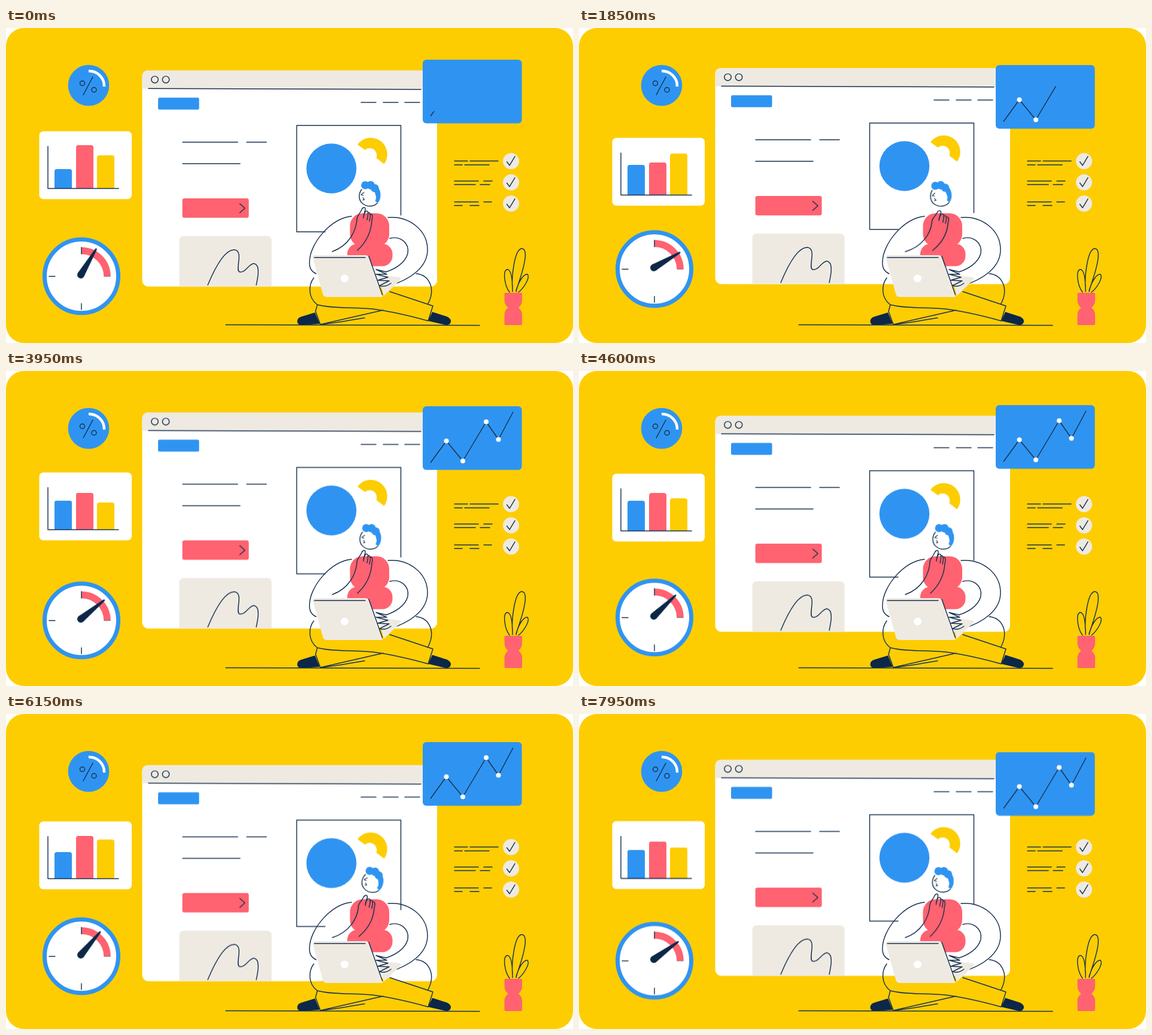
These frames come from a looping animation (947x527 px, 8 s). An HTML page without scripts:

```html
<!DOCTYPE html>
<html lang="en">
<head>
<meta charset="utf-8">
<title>Dashboard at work</title>
<style>
  :root {
    --both: cubic-bezier(.37, 0, .63, 1);
    --in: cubic-bezier(.4, 0, .7, .65);
    --out: cubic-bezier(.3, .35, .6, 1);
  }
  html, body { margin: 0; width: 100%; height: 100%; overflow: hidden; background: #fff; }
  svg { display: block; width: 100%; height: 100%; }

  .blue { fill: #2f94f1; }
  .pink { fill: #ff6270; }
  .yellow { fill: #fdcd02; }
  .beige { fill: #eeeae2; }
  .white { fill: #fff; }
  .navy { fill: #0c2748; }
  .ink { fill: none; stroke: #17304f; stroke-width: 1.45; stroke-linecap: round; stroke-linejoin: round; }
  .fine { stroke-width: 1.1; }

  .move { animation: 8s infinite var(--both); }
  .page { animation-name: page; }
  .bars { animation-name: bars; }
  .dial { animation-name: dial; }
  .chart { animation-name: chart; }
  .bar1 { animation-name: bar1; }
  .bar2 { animation-name: bar2; }
  .bar3 { animation-name: bar3; }
  .needle { animation-name: needle; transform-origin: 125px 413px; }
  .head { animation-name: head; transform-origin: 607px 310px; }
  .arm { animation-name: arm; transform-origin: 545px 377px; }
  .trend { stroke-dasharray: 253; stroke-linecap: butt; animation: trend 8s infinite linear; }

  @keyframes page {
    0% { transform: none; animation-timing-function: linear; }
    23.125% { transform: translateY(-4px); animation-timing-function: var(--out); }
    35.5% { transform: translateY(-6px); }
    81.5% { transform: translateY(15px); animation-timing-function: var(--in); }
    99.375%, 100% { transform: translateY(5.5px); }
  }
  @keyframes bars {
    0% { transform: none; }
    23.125% { transform: translateY(11px); animation-timing-function: var(--in); }
    38.125% { transform: translateY(4px); animation-timing-function: var(--out); }
    49.375% { transform: translateY(-3px); animation-timing-function: var(--in); }
    65% { transform: translateY(-.5px); animation-timing-function: var(--out); }
    76.875% { transform: translateY(7px); }
    99.375%, 100% { transform: translateY(6.5px); }
  }
  @keyframes dial {
    0% { transform: none; }
    23.125% { transform: translateY(-12px); animation-timing-function: var(--in); }
    38.125% { transform: translateY(-3px); animation-timing-function: var(--out); }
    49.375% { transform: translateY(2px); animation-timing-function: var(--in); }
    65% { transform: translateY(-4px); animation-timing-function: var(--out); }
    76.875% { transform: translateY(-10px); }
    99.375%, 100% { transform: translateY(-2.5px); }
  }
  @keyframes chart {
    0% { transform: none; }
    23.125% { transform: translateY(9px); }
    38.125% { transform: translateY(-1px); }
    49.375% { transform: translateY(6px); animation-timing-function: var(--in); }
    65% { transform: translateY(3.7px); animation-timing-function: var(--out); }
    76.875% { transform: translateY(-6px); }
    99.375%, 100% { transform: translateY(10.5px); }
  }
  @keyframes bar1 {
    0% { transform: none; }
    23.125% { transform: translateY(-18px); }
    38.125% { transform: translateY(-15.5px); }
    49.375% { transform: translateY(-16.5px); }
    65% { transform: translateY(-19.5px); }
    76.875% { transform: translateY(-12px); }
    99.375%, 100% { transform: translateY(-15.5px); }
  }
  @keyframes bar2 {
    0% { transform: none; }
    23.125% { transform: translateY(18px); }
    38.125% { transform: translateY(8px); }
    49.375% { transform: translateY(10.5px); }
    65% { transform: translateY(8.5px); }
    76.875% { transform: translateY(1px); }
    99.375%, 100% { transform: translateY(10.5px); }
  }
  @keyframes bar3 {
    0% { transform: none; }
    23.125% { transform: translateY(-14px); animation-timing-function: var(--in); }
    38.125% { transform: translateY(1px); animation-timing-function: var(--out); }
    49.375% { transform: translateY(10px); animation-timing-function: var(--in); }
    65% { transform: translateY(-1px); animation-timing-function: var(--out); }
    76.875% { transform: translateY(-10px); }
    99.375%, 100% { transform: translateY(3.5px); }
  }
  @keyframes needle {
    0% { transform: rotate(30.6deg); }
    23.125% { transform: rotate(59.6deg); }
    38.125% { transform: rotate(42.7deg); }
    49.375% { transform: rotate(51deg); }
    65% { transform: rotate(42deg); }
    76.875% { transform: rotate(40deg); }
    99.375%, 100% { transform: rotate(54deg); }
  }
  @keyframes head {
    0% { transform: rotate(0deg); }
    23.125% { transform: rotate(-6deg); }
    38.125%, 49.375% { transform: rotate(2deg); }
    65% { transform: rotate(1.5deg); }
    76.875% { transform: rotate(9deg); }
    99.375%, 100% { transform: rotate(.5deg); }
  }
  @keyframes arm {
    0% { transform: scale(1); }
    23.125% { transform: scale(1.08, .93); }
    38.125% { transform: scale(.95, 1.05); }
    49.375%, 65% { transform: scale(1); }
    76.875% { transform: scale(1.06, .96); }
    99.375%, 100% { transform: scale(.99, .99); }
  }
  @keyframes trend {
    0% { stroke-dashoffset: 243; }
    39.1%, 100% { stroke-dashoffset: 0; }
  }
</style>
</head>
<body>
<svg viewBox="0 0 947 527" preserveAspectRatio="none">
  <defs>
    <clipPath id="floor"><rect x="60" y="100" width="140" height="168.5"/></clipPath>
    <g id="check">
      <circle class="beige" r="13.5"/>
      <path class="ink" d="M-7 1 L-2.5 7 L6.5 -8"/>
    </g>
  </defs>
  <rect class="yellow" width="947" height="527" rx="30"/>

  <!-- percent badge -->
  <circle class="blue" cx="138" cy="96" r="34.3"/>
  <path d="M138 72 A25 25 0 0 1 164 98" fill="none" stroke="#fff" stroke-width="4.5"/>
  <path class="ink" d="M129 112 L145 82"/>
  <circle class="ink" cx="127.5" cy="92.5" r="4"/>
  <circle class="ink" cx="147" cy="103.5" r="4"/>

  <!-- bar card -->
  <g class="move bars">
    <rect class="white" x="55.5" y="172.7" width="154.5" height="113.5" rx="7"/>
    <g clip-path="url(#floor)">
      <rect class="blue move bar1" x="81" y="236" width="29" height="120" rx="4"/>
      <rect class="pink move bar2" x="117" y="196" width="29" height="120" rx="4"/>
      <rect class="yellow move bar3" x="152" y="213" width="29" height="120" rx="4"/>
    </g>
    <path class="ink" d="M70 198 V268.5 H188"/>
  </g>

  <!-- gauge -->
  <g class="move dial">
    <circle cx="126" cy="415.3" r="61.5" fill="#fff" stroke="#2f94f1" stroke-width="7"/>
    <path d="M126 372.5 A43 43 0 0 1 169 415.5" fill="none" stroke="#ff6270" stroke-width="11.5"/>
    <path class="ink" d="M126 367 V378 M126 461 V471 M72 415.5 H82"/>
    <path class="ink fine" d="M164 415.5 H174" opacity=".5"/>
    <path class="navy move needle" d="M119 413 A6 6 0 0 0 131 413 L126.5 363 Q125 360 123.5 363 Z"/>
  </g>

  <!-- browser page -->
  <g class="move page">
    <rect class="white" x="227.5" y="71" width="492.5" height="361.5" rx="10"/>
    <path class="beige" d="M227.5 101.5 V81 Q227.5 71 237.5 71 H710 Q720 71 720 81 V102.5 H693 Z"/>
    <path class="ink" d="M238 101.3 L693 102.7"/>
    <circle class="ink" cx="248.5" cy="86.3" r="5.7"/>
    <circle class="ink" cx="267" cy="86.3" r="5.7"/>
    <rect class="blue" x="254" y="116.5" width="68.5" height="20" rx="2.5"/>
    <path class="ink" d="M593 124.5 H618 M630 124.5 H655 M666 124.5 H691"/>
    <path class="ink" d="M295 191 H387 M402 191 H435 M295 227 H391"/>
    <rect class="pink" x="294.5" y="285" width="111" height="32.5" rx="3.5"/>
    <path class="ink" d="M390.5 294 L399 301.5 L390.5 309"/>
    <path class="beige" d="M289.5 432.5 V356 Q289.5 348 297.5 348 H435.5 Q443.5 348 443.5 356 V432.5 Z"/>
    <path class="ink" d="M337 430 C347 406 364 371 381 371 C398 372 382 405 390 408 C399 411 406 394 414 394 C425 396 421 416 418 430"/>
    <path class="ink" d="M533 341 H485.5 V163 H659.5 V313"/>
    <circle class="blue" cx="543.5" cy="235" r="41.8"/>
    <path class="yellow" d="M587 195 A27.5 27.5 0 0 1 631.5 227.5 L618.5 217.5 A12 12 0 0 0 599.5 204 Z"/>
  </g>

  <!-- trend card -->
  <g class="move chart">
    <rect class="blue" x="696" y="53" width="165.5" height="106.5" rx="6"/>
    <path class="ink trend" d="M709 147.5 L735.5 111 L763 144.5 L802 79 L822.5 108.5 L847 62.5"/>
    <g class="white">
      <circle cx="735.5" cy="111" r="0"><animate attributeName="r" values="0;0;4;4" keyTimes="0;.055;.07;1" dur="8s" repeatCount="indefinite"/></circle>
      <circle cx="763" cy="144.5" r="0"><animate attributeName="r" values="0;0;4;4" keyTimes="0;.125;.14;1" dur="8s" repeatCount="indefinite"/></circle>
      <circle cx="802" cy="79" r="0"><animate attributeName="r" values="0;0;4;4" keyTimes="0;.247;.262;1" dur="8s" repeatCount="indefinite"/></circle>
      <circle cx="822.5" cy="108.5" r="0"><animate attributeName="r" values="0;0;4;4" keyTimes="0;.305;.32;1" dur="8s" repeatCount="indefinite"/></circle>
    </g>
  </g>

  <!-- checklist -->
  <path class="ink" d="M749 222.5 H771 M775 222.5 H822 M749 229 H762 M766 229 H807
    M749 256 H789 M798 256 H812 M749 262 H784 M792 262 H808
    M749 291 H789 M798 291 H811 M749 297 H762 M775 297 H790"/>
  <use href="#check" x="843.5" y="222.8"/>
  <use href="#check" x="843.5" y="258.3"/>
  <use href="#check" x="843.5" y="293.8"/>

  <!-- plant -->
  <path class="ink" d="M846 437 C844 417 849 371 861 369 C875 369 863 408 852 439
    M841 442 C833 432 829 406 837 404 C845 404 846 428 846 441
    M852 441 C855 426 864 411 871 412 C876 418 864 436 856 442"/>
  <path class="pink" d="M834.5 443 H860 Q862 443 862 445 V455 Q862 463 856 468 Q862 473 862 480 V495 Q862 497 860 497 H834.5 Q832.5 497 832.5 495 V480 Q832.5 473 838.5 468 Q832.5 463 832.5 455 V445 Q832.5 443 834.5 443 Z"/>

  <!-- legs -->
  <path class="yellow" d="M519 463 L526 447 L640 441 L713 465 L706 492 H526 Z"/>
  <path class="ink" d="M367 496.5 L791 497.5"/>
  <path class="navy" d="M516 476 L524 495 L493 497 Q486 496 486.5 490 Q487 485 493 483 Z"/>
  <path class="navy" d="M712 475 L737 483 Q743 486 743 491 Q742 497 735 497 L705 490 Z"/>
  <path class="ink" d="M514 418 C505 430 504 451 520 463 C548 470 580 467 612 470 C650 475 680 483 705 490 L713 465 L641 441
    M520 463 L517 474 L525 496 C550 494 578 488 599 485 M525 496 L630 472
    M685 411 C707 413 718 436 705 461"/>

  <!-- torso and arms -->
  <rect class="pink" x="574.5" y="310" width="65.5" height="56" rx="21"/>
  <rect class="pink" x="570" y="361" width="75.5" height="37.5" rx="17"/>
  <path class="ink" d="M577 315 C541 319 508 361 507 390 C506 401 511 408 518 411
    M638 317 C673 314 704 338 704 371 C704 401 674 421 641 431
    M641 352 C660 347 674 361 671 377 C667 393 650 403 635 408"/>
  <g class="move arm">
    <path class="ink" d="M545 374 C573 364 584 340 586 322 C585 315 591 311 594 304 C596 299 601 299 600 304 L597 315
      M597 318 C598 309 601 304 604 307 C606 310 604 315 603 321
      M604 310 C608 307 610 311 607 323
      M608 312 C612 310 613 315 611 322 C610 340 602 358 587 372"/>
  </g>

  <!-- laptop -->
  <path class="beige" d="M622 413 L657 417 Q662 418 658 422 L631 448 Z"/>
  <path class="beige" d="M517 380 H600 Q605 380 606.5 385 L629 450 H536 Q531 450 529.5 446 L512.5 385 Q511.5 380 517 380 Z"/>
  <path class="ink" d="M515 384 H600 M606 382 L628.5 446"/>
  <circle class="white" cx="565.5" cy="419" r="6.5"/>
  <path class="ink" d="M635 408 L618 404 L636 412 L618 412 L638 417 L621 422 L640 423 L624 431 C632 434 639 430 643 427"/>

  <!-- head -->
  <g class="move head">
    <circle class="white" cx="607.5" cy="281.5" r="16.5"/>
    <path class="ink" d="M594 270 C588 278 589 289 596 294 C604 300 614 299 620 293"/>
    <path class="ink fine" d="M598 275 L593 279 L597 280 M596 284 Q599 285 597 287 M596 288 L599 287"/>
    <g class="blue">
      <circle cx="600" cy="263" r="6.8"/>
      <circle cx="609" cy="263" r="7"/>
      <circle cx="616" cy="268" r="6.8"/>
      <path d="M608 268 L621 266 Q626 272 625.5 281 Q625 289 620.5 293 L616.5 289 Q619.5 284 617 279 Q617 273 608 268 Z"/>
    </g>
  </g>
</svg>
</body>
</html>
```
